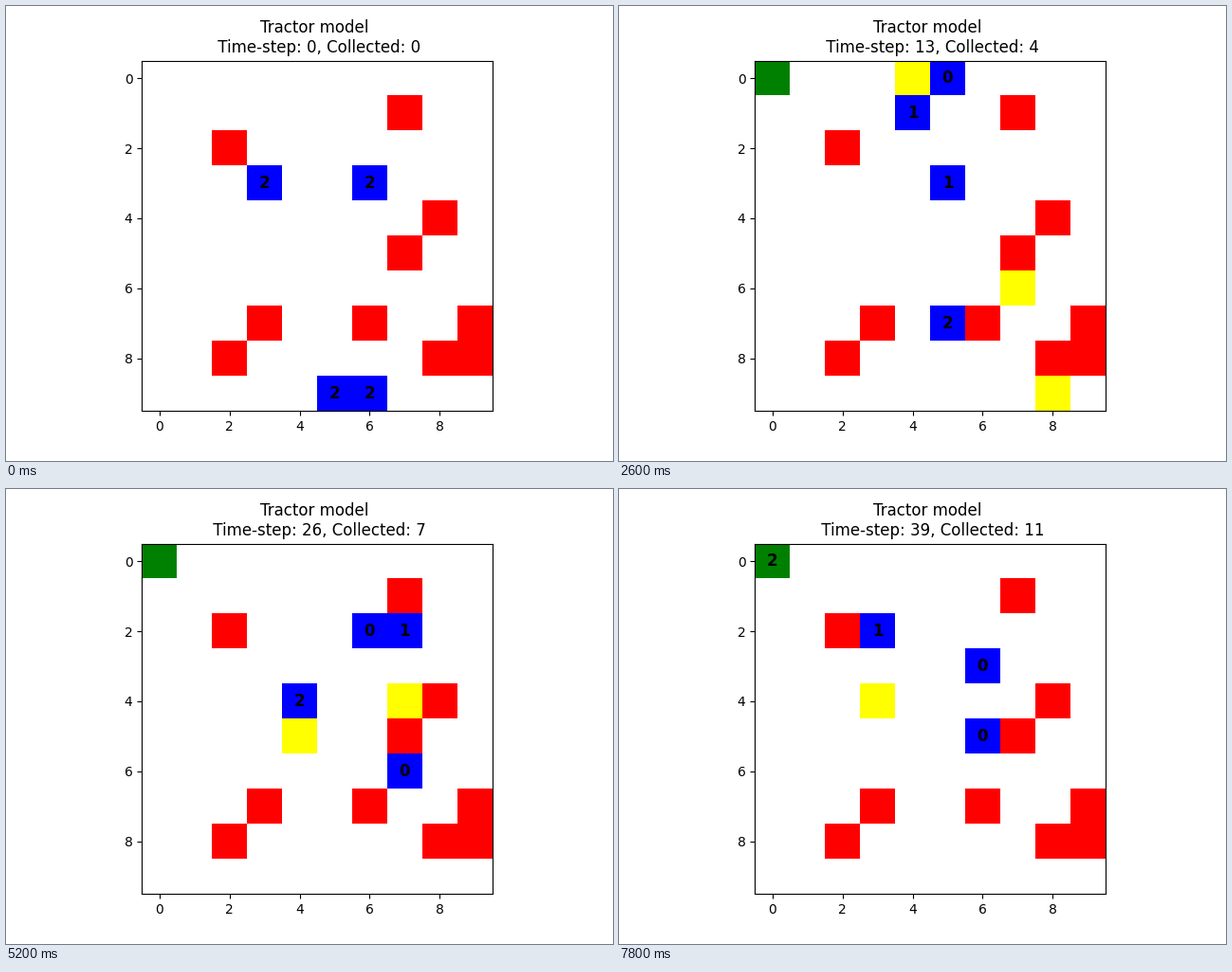
Write a matplotlib script that moves like this. It is 640 by 480 pixels and loops after 8000 ms.

```python
import numpy as np
import matplotlib.pyplot as plt
from matplotlib.animation import FuncAnimation
from matplotlib.colors import ListedColormap

SIZE = 10
STEPS = 40
CAPACITY = 2
HOME = (0, 0)
FREE, ROCK, CROP, TRACTOR, DEPOT = range(5)
COLORS = ListedColormap(["white", "red", "yellow", "blue", "green"])
RIGHT, UP, DOWN, LEFT = (1, 0), (0, -1), (0, 1), (-1, 0)

ROCKS = [(7, 1), (2, 2), (8, 4), (7, 5), (3, 7), (6, 7),
         (9, 7), (2, 8), (8, 8), (9, 8)]


def crop(x, y):
    return (x, y), True


def via(x, y):
    return (x, y), False


REFILL = via(*HOME)

# start cell, stops in order, steps spent waiting
PLANS = [
    ((3, 3), [crop(1, 5), crop(5, 3), REFILL, crop(4, 5), crop(7, 9), REFILL],
     []),
    ((6, 3), [via(3, 1), crop(1, 3), crop(8, 9), REFILL], []),
    ((5, 9), [crop(3, 1), crop(7, 6), REFILL, crop(2, 0), crop(3, 4)], [6, 7]),
    ((6, 9), [crop(4, 0), crop(7, 4), via(6, 3)], [*range(2, 12), 30]),
]


def shortest_path(start, goal):
    """Breadth-first search; ties go to the earlier direction."""
    came = {start: None}
    queue = [start]
    for x, y in queue:
        for dx, dy in (RIGHT, UP, DOWN, LEFT):
            cell = x + dx, y + dy
            inside = 0 <= min(cell) and max(cell) < SIZE
            if inside and cell not in came and cell not in ROCKS:
                came[cell] = (x, y)
                queue.append(cell)
    path = []
    while goal != start:
        path.append(goal)
        goal = came[goal]
    return path[::-1]


def drive(start, stops, waits):
    """Cells and free room at every step, and crops as (cell, shown, taken)."""
    cells, rooms, crops = [start], [CAPACITY], []
    shown = 1
    for goal, is_crop in stops:
        for cell in shortest_path(cells[-1], goal):
            while len(cells) in waits:
                cells.append(cells[-1])
                rooms.append(rooms[-1])
            cells.append(cell)
            rooms.append(rooms[-1])
        now = len(cells) - 1
        if is_crop:
            crops.append((goal, shown, now))
            rooms[-1] -= 1
        elif goal == HOME:
            rooms[-1] = CAPACITY
        if is_crop or goal == HOME:
            shown = now + 1
    rest = max(0, STEPS - len(cells))
    return cells + cells[-1:] * rest, rooms + rooms[-1:] * rest, crops


tractors = [drive(*plan) for plan in PLANS]
all_crops = [c for *_, crops in tractors for c in crops]


def field(step):
    grid = np.full((SIZE, SIZE), FREE)

    def fill(cell, kind):
        grid[cell[1], cell[0]] = kind

    for rock in ROCKS:
        fill(rock, ROCK)
    for cell, shown, taken in all_crops:
        if shown <= step < taken:
            fill(cell, CROP)
    for cells, *_ in tractors:
        fill(cells[step], TRACTOR)
    if step > 0:
        fill(HOME, DEPOT)
    return grid


fig, ax = plt.subplots(figsize=(6.4, 4.8), dpi=100)
image = ax.imshow(field(0), cmap=COLORS, vmin=FREE, vmax=DEPOT,
                  interpolation="nearest")
title = ax.set_title("")
labels = [ax.text(0, 0, "", ha="center", va="center", color="black",
                  fontsize=12, fontweight="bold") for _ in tractors]


def update(step):
    image.set_data(field(step))
    for label, (cells, rooms, _) in zip(labels, tractors):
        label.set_position(cells[step])
        label.set_text(str(rooms[step]))
    collected = sum(taken <= step for *_, taken in all_crops)
    title.set_text(f"Tractor model \n Time-step: {step}, Collected: {collected}")
    return [image, title, *labels]


anim = FuncAnimation(fig, update, frames=STEPS, interval=200, repeat=True,
                     repeat_delay=0, blit=False)
plt.show()
```
